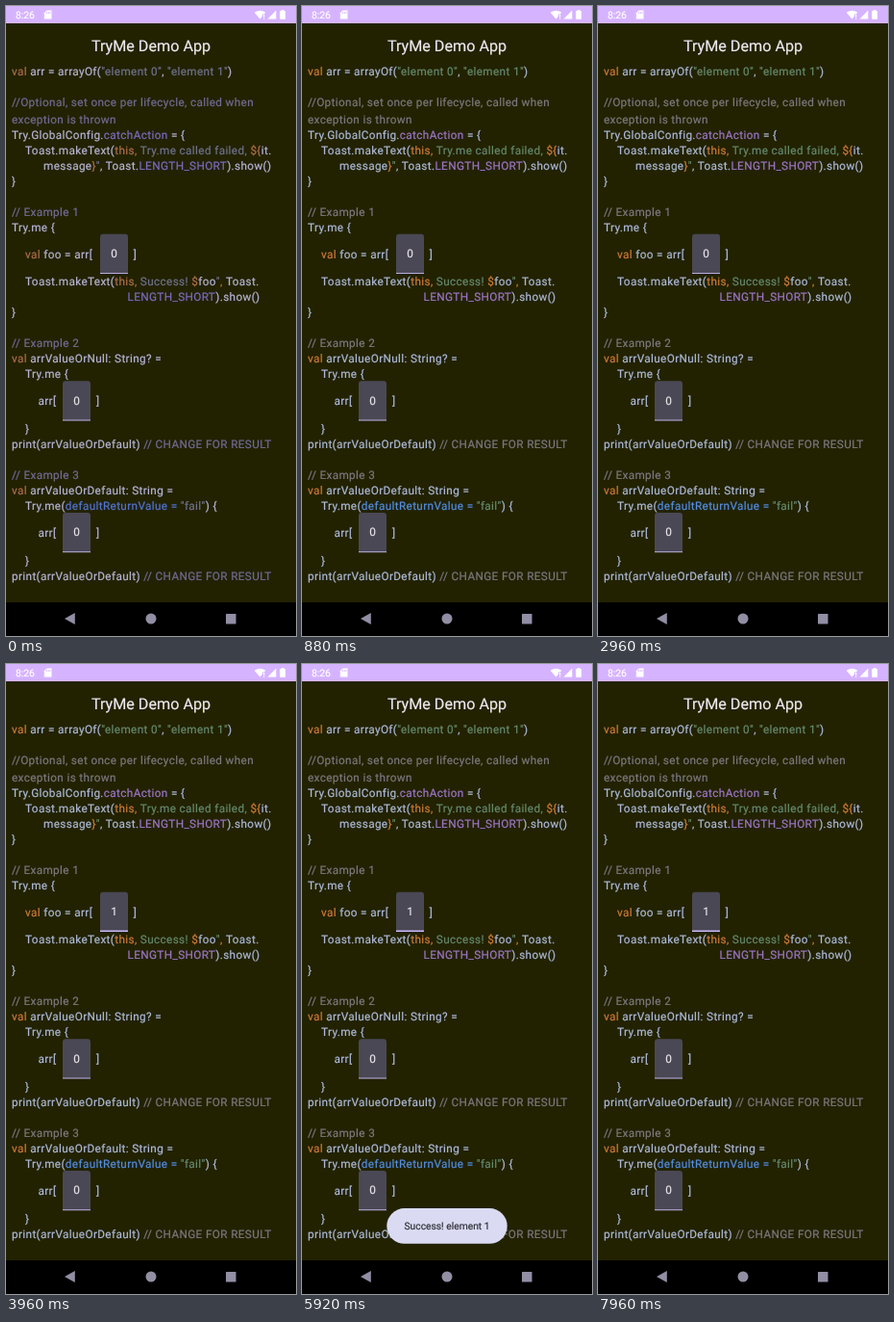
Recreate the animation shown at these times as an HTML page with a canvas. Size 302 by 654 pixels, loop 8 s.

```html
<!DOCTYPE html>
<html lang="en">
<head>
<meta charset="utf-8">
<title>Demo app</title>
<style>
  html, body { margin: 0; width: 100%; height: 100%; overflow: hidden; background: #222200; }
  canvas { display: block; width: 302px; height: 654px; }
</style>
</head>
<body>
<canvas id="stage"></canvas>
<script>
const W = 302, H = 654, LOOP = 8000;
const TYPED_AT = 3400, FOCUS_AT = 3000, SETTLE = 600;
const TOAST = { inAt: 4400, inEnd: 4900, outAt: 6900, outEnd: 7340 };

const canvas = document.getElementById('stage');
const ctx = canvas.getContext('2d');
const dpr = window.devicePixelRatio || 1;
canvas.width = W * dpr;
canvas.height = H * dpr;

// Each role: muted colour at the start, settled colour afterwards.
const ROLES = {
  t: [[184, 181, 214], [174, 186, 216]],
  o: [[176, 110, 76], [208, 122, 56]],
  g: [[112, 114, 142], [102, 138, 110]],
  c: [[114, 107, 148], [124, 120, 126]],
  p: [[124, 108, 194], [158, 118, 200]],
  b: [[82, 116, 214], [82, 142, 228]]
};

// x, baseline, then pairs of role and text
const LINES = [
  [6, 72.4, 'o', 'val ', 't', 'arr = arrayOf(', 'g', '"element 0"', 't', ', ', 'g', '"element 1"', 't', ')'],
  [6, 104.4, 'c', '//Optional, set once per lifecycle, called when'],
  [6, 122, 'c', 'exception is thrown'],
  [6, 137.5, 't', 'Try.GlobalConfig.', 'p', 'catchAction', 't', ' = {'],
  [20, 153.5, 't', 'Toast.makeText(', 'o', 'this, ', 'g', 'Try.me called failed, ', 'o', '${', 't', 'it.'],
  [39, 169.7, 't', 'message', 'o', '}', 'g', '"', 't', ', Toast.', 'p', 'LENGTH_SHORT', 't', ').show()'],
  [6, 185.8, 't', '}'],
  [6, 217.6, 'c', '// Example 1'],
  [6, 233.7, 't', 'Try.me {'],
  [20, 261.6, 'o', 'val ', 't', 'foo = arr['],
  [132.7, 261.6, 't', ']'],
  [20, 290, 't', 'Toast.makeText(', 'o', 'this, ', 'g', 'Success! ', 'o', '$', 't', 'foo', 'g', '"', 'o', ', ', 't', 'Toast.'],
  [126.5, 306.4, 'p', 'LENGTH_SHORT', 't', ').show()'],
  [6, 322.3, 't', '}'],
  [6, 354.2, 'c', '// Example 2'],
  [6, 370.2, 'o', 'val ', 't', 'arrValueOrNull: String? ='],
  [20, 386.3, 't', 'Try.me {'],
  [33.5, 414.2, 't', 'arr['],
  [94, 414.2, 't', ']'],
  [20, 443, 't', '}'],
  [6, 459, 't', 'print(arrValueOrDefault) ', 'c', '// CHANGE FOR RESULT'],
  [6, 491, 'c', '// Example 3'],
  [6, 507, 'o', 'val ', 't', 'arrValueOrDefault: String ='],
  [20, 523, 't', 'Try.me(', 'b', 'defaultReturnValue = ', 'g', '"fail"', 't', ') {'],
  [33.5, 551, 't', 'arr['],
  [94, 551, 't', ']'],
  [20, 579.7, 't', '}'],
  [6, 595.7, 't', 'print(arrValueOrDefault) ', 'c', '// CHANGE FOR RESULT']
];

const clamp = v => Math.max(0, Math.min(1, v));
const ease = v => v * v * (3 - 2 * v);

function setFont(size, weight = 400, spacing = 0) {
  ctx.font = `${weight} ${size}px Roboto, sans-serif`;
  ctx.letterSpacing = spacing + 'px';
  ctx.textRendering = 'geometricPrecision';
}

// A hairline outline gives the slightly heavy look of small text on a phone.
function label(text, x, y, color, align = 'left') {
  ctx.textAlign = align;
  ctx.fillStyle = ctx.strokeStyle = color;
  ctx.lineWidth = 0.2;
  ctx.fillText(text, x, y);
  ctx.strokeText(text, x, y);
}

function rect(x, y, w, h, color, radii = 0) {
  ctx.fillStyle = color;
  ctx.beginPath();
  ctx.roundRect(x, y, w, h, radii);
  ctx.fill();
}

function poly(color, ...pts) {
  ctx.fillStyle = color;
  ctx.beginPath();
  for (let i = 0; i < pts.length; i += 2) ctx.lineTo(pts[i], pts[i + 1]);
  ctx.fill();
}

function drawStatusBar() {
  rect(0, 0, W, 18, '#d6b3ff');
  setFont(10.3);
  label('8:26', 10, 12.8, '#fff');
  // Memory card
  poly('#fff', 42.5, 4.5, 47.5, 4.5, 47.5, 13.5, 39.8, 13.5, 39.8, 7.2);
  for (let i = 0; i < 3; i++) rect(42.2 + i * 1.7, 6, 0.8, 2, '#d6b3ff');
  // Wi-Fi fan
  ctx.fillStyle = '#fff';
  ctx.beginPath();
  ctx.moveTo(264.5, 13.5);
  ctx.lineTo(258.7, 6.7);
  ctx.quadraticCurveTo(264.5, 2.6, 270.3, 6.7);
  ctx.fill();
  rect(267, 8.5, 4, 5.5, '#d6b3ff');
  rect(268, 9, 1.2, 2.8, '#fff');
  rect(268, 12.5, 1.2, 1.2, '#fff');
  poly('#fff', 281.3, 4.5, 281.3, 13.5, 272.5, 13.5);
  // Battery
  rect(286.8, 4, 2.6, 1.5, '#fff');
  rect(285.2, 5, 5.8, 8.7, '#fff', 0.7);
}

function drawNavBar() {
  const grey = '#928ea4';
  rect(0, 619, W, 35, '#000');
  poly(grey, 61, 636, 71.8, 630, 71.8, 642);
  ctx.beginPath();
  ctx.arc(151, 636, 5.5, 0, Math.PI * 2);
  ctx.fill();
  rect(229, 631, 10.5, 10.5, grey, 0.5);
}

function drawCode(t) {
  const k = ease(clamp(t / SETTLE));
  const colors = {};
  for (const role in ROLES) {
    const [from, to] = ROLES[role];
    colors[role] = `rgb(${from.map((v, i) => Math.round(v + (to[i] - v) * k))})`;
  }
  setFont(11.76, 400, 0.3675);
  for (const [left, y, ...parts] of LINES) {
    let x = left;
    for (let i = 0; i < parts.length; i += 2) {
      label(parts[i + 1], x, y, colors[parts[i]]);
      x += ctx.measureText(parts[i + 1]).width;
    }
  }
}

function drawField(x, y, value, focused) {
  const line = focused ? 1.5 : 1;
  rect(x, y, 29, 41.2, '#4a4855', [3, 3, 0, 0]);
  rect(x, y + 41.2 - line, 29, line, focused ? '#cbb8fa' : '#b9aedb');
  setFont(11.76, 400, 0.3675);
  label(value, x + 11.2, y + 24.3, '#e6e1e5');
}

function drawToast(t) {
  const shown = clamp((t - TOAST.inAt) / (TOAST.inEnd - TOAST.inAt));
  const hidden = clamp((t - TOAST.outAt) / (TOAST.outEnd - TOAST.outAt));
  const alpha = ease(shown) * (1 - ease(hidden));
  if (!alpha) return;
  ctx.globalAlpha = alpha;
  rect(88.3, 565, 125.4, 36.8, '#dadaf2', 18.4);
  setFont(10.29);
  label('Success! element 1', 151, 587, '#303038', 'center');
  ctx.globalAlpha = 1;
}

function draw(t) {
  ctx.setTransform(dpr, 0, 0, dpr, 0, 0);
  rect(0, 0, W, H, '#222200');
  drawStatusBar();
  setFont(16.17);
  label('TryMe Demo App', 151, 46.8, '#eeeaf0', 'center');
  drawCode(t);
  drawField(98, 236.8, t < TYPED_AT ? '0' : '1', t >= FOCUS_AT);
  drawField(59, 389.3, '0', false);
  drawField(59, 526, '0', false);
  drawToast(t);
  drawNavBar();
}

const start = performance.now();
function tick() {
  draw((performance.now() - start) % LOOP);
  requestAnimationFrame(tick);
}
tick();
</script>
</body>
</html>
```
